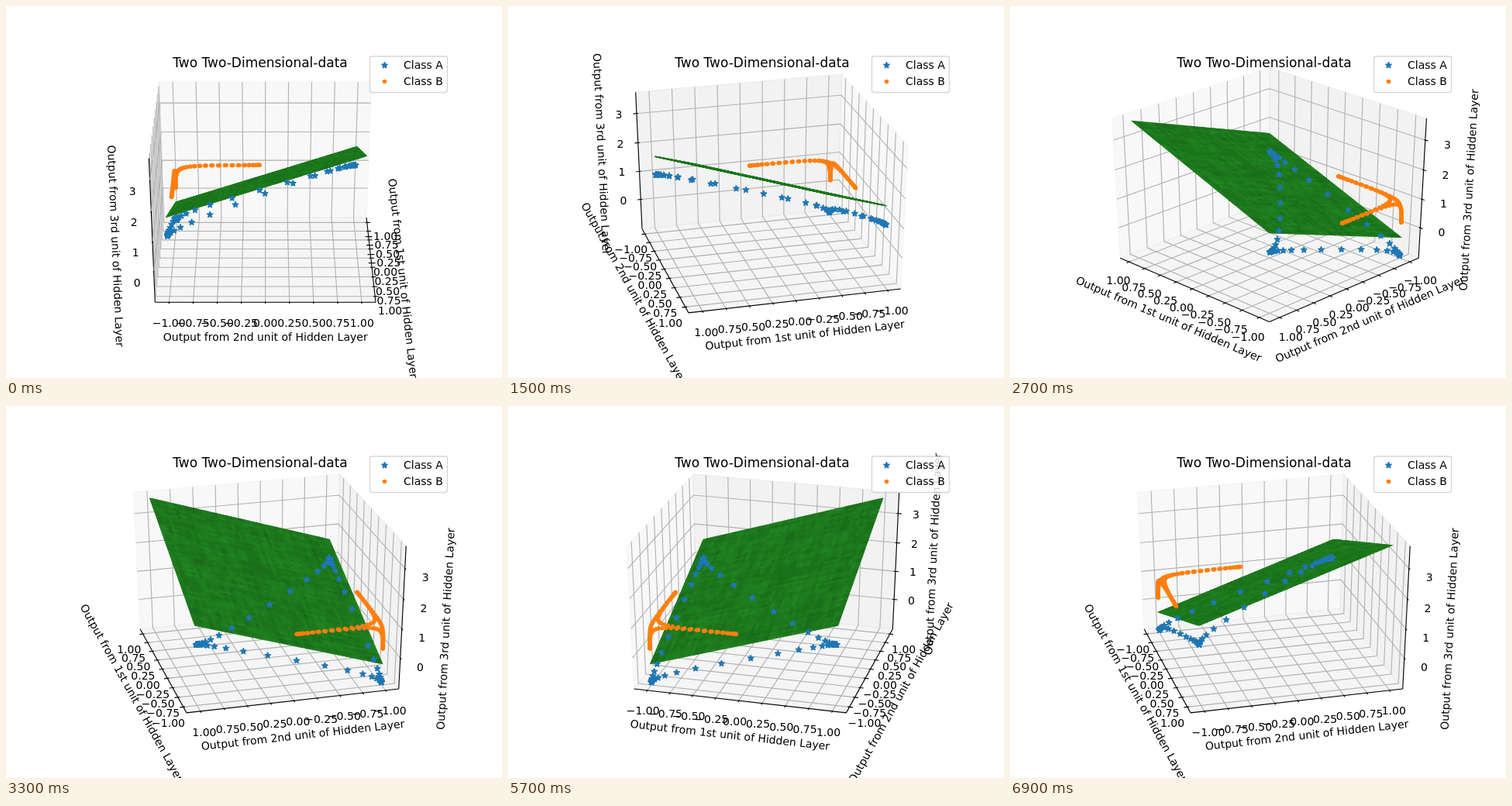
Animation, 640 px wide and 480 px high, one loop 7.2 s. Source, as an HTML page with a canvas:

```html
<!DOCTYPE html>
<html lang="en">
<head>
<meta charset="utf-8">
<title>Two Two-Dimensional-data</title>
<style>
  html, body { margin: 0; width: 100%; height: 100%; overflow: hidden; background: #fff; }
  canvas { display: block; }
</style>
</head>
<body>
<canvas id="stage" width="640" height="480"></canvas>
<script>
const ctx = document.getElementById('stage').getContext('2d');

const STEP_MS = 300, STEPS = 24;
const RAD = Math.PI / 180, ELEVATION = 30 * RAD, DISTANCE = 10;
const PT = 100 / 72;                      // pixels per typographic point
const HALF = 0.5 + 1 / 48;                // half side of the drawn box
const DELTA = 1 / 12, PAD = 48 / 623.232 * DELTA;
const LABEL_SHIFT = 25 * PAD, TICK_LABEL_SHIFT = 11.5 * PAD;
const LIMITS = [[-1.1, 1.1], [-1.1, 1.1], [-0.985, 3.62]];
const BLUE = '#1f77b4', ORANGE = '#ff7f0e';

const quarters = Array.from({ length: 9 }, (_, i) => i / 4 - 1);
const decimals = v => v.toFixed(2).replace('-', '\u2212');
const AXES = [
  { ticks: quarters, format: decimals, flip: 1, tickDir: 1, pane: 0.95, label: 'Output from 1st unit of Hidden Layer' },
  { ticks: quarters, format: decimals, flip: 0, tickDir: 0, pane: 0.90, label: 'Output from 2nd unit of Hidden Layer' },
  { ticks: [0, 1, 2, 3], format: String, flip: 0, tickDir: 0, pane: 0.925, label: 'Output from 3rd unit of Hidden Layer' }
];

// Data values to coordinates relative to the centre of the box.
const scale = (v, axis) => (v - LIMITS[axis][0]) / (LIMITS[axis][1] - LIMITS[axis][0]) - 0.5;
const place = point => point.map(scale);

// Each class is a circle of inputs passed through three tanh units.
const SAMPLES = 99;
function hiddenOutputs(radius) {
  const unit = (theta, angle, gain, bias) =>
    Math.tanh(gain * (radius * Math.cos((theta - angle) * RAD) - bias));
  return Array.from({ length: SAMPLES }, (_, i) => {
    const theta = i * 360 / SAMPLES;
    return place([
      unit(theta, 0.37, 5.8, 0.506),
      unit(theta, 121.47, 5.8, 0.506),
      -unit(theta, 241, 5.4, 0.531)
    ]);
  });
}
const classA = hiddenOutputs(1), classB = hiddenOutputs(0.495);

// Separating plane, cut into slightly uneven green cells.
const CELLS = 50;
const noise = (i, j) => {
  const n = Math.sin(i * 127.1 + j * 311.7) * 43758.5453;
  return n - Math.floor(n) - 0.5;
};
const planePoint = (i, j) => {
  const x = 2 * i / CELLS - 1, y = 2 * j / CELLS - 1;
  return place([x, y, 1.644 + 0.988 * (x + y)]);
};
const cells = [];
for (let i = 0; i < CELLS; i++) {
  for (let j = 0; j < CELLS; j++) {
    const shade = 0.87 + 0.04 * (noise(i, 90) + noise(80, j)) +
      0.09 * noise(i >> 2, j + 7) + 0.09 * noise(i + 9, j >> 2) + 0.04 * noise(i, j);
    cells.push({
      color: `rgb(${[34, 139, 34].map(c => Math.round(c * shade))})`,
      corners: [[i, j], [i + 1, j], [i + 1, j + 1], [i, j + 1]].map(c => planePoint(...c))
    });
  }
}

let camera, right, up;
function aim(azimuth) {
  const c = Math.cos(azimuth), s = Math.sin(azimuth);
  const ce = Math.cos(ELEVATION), se = Math.sin(ELEVATION);
  camera = [ce * c, ce * s, se];
  right = [-s, c, 0];
  up = [-se * c, -se * s, ce];
}
const dot = (a, b) => a[0] * b[0] + a[1] * b[1] + a[2] * b[2];
function project(p) {
  const depth = DISTANCE - dot(p, camera);
  return [
    80 + (dot(p, right) / depth + 0.095) / 0.185 * 496,
    427.2 - (dot(p, up) / depth + 0.095) / 0.185 * 369.6
  ];
}

function withCoord(p, axis, value) {
  const q = p.slice();
  q[axis] = value;
  return q;
}
const flipped = (p, axis) => withCoord(p, axis, -p[axis]);
const pushOut = (p, axis, amount) =>
  p.map((v, k) => k === axis ? v : v + (v < 0 ? -amount : amount));

function trace(points) {
  ctx.beginPath();
  points.forEach(p => ctx.lineTo(...project(p)));
}
function line(points, color) {
  trace(points);
  ctx.strokeStyle = color;
  ctx.lineWidth = 0.8 * PT;
  ctx.stroke();
}
function text(string, x, y, size = 14, align = 'center') {
  ctx.font = `${size}px "DejaVu Sans", sans-serif`;
  ctx.textAlign = align;
  ctx.fillStyle = '#000';
  ctx.fillText(string, x, y);
}

function drawPane(axis, corner) {
  const a = (axis + 1) % 3, b = (axis + 2) % 3;
  const grey = AXES[axis].pane * 255;
  trace([corner, flipped(corner, a), flipped(flipped(corner, a), b), flipped(corner, b)]);
  ctx.closePath();
  ctx.fillStyle = ctx.strokeStyle = `rgba(${grey},${grey},${grey},0.5)`;
  ctx.lineWidth = PT;
  ctx.fill();
  ctx.stroke();
}

function drawAxis(axis, corner) {
  const { ticks, format, flip, tickDir, label } = AXES[axis];
  const start = flipped(corner, flip), end = flipped(start, axis);
  line([start, end], '#000');

  const [x1, y1] = project(start), [x2, y2] = project(end);
  let angle = Math.atan2(y2 - y1, x2 - x1);
  if (angle >= Math.PI / 2) angle -= Math.PI;
  if (angle < -Math.PI / 2) angle += Math.PI;
  ctx.save();
  ctx.translate(...project(pushOut(withCoord(start, axis, 0), axis, LABEL_SHIFT)));
  ctx.rotate(angle);
  text(label, 0, 4);
  ctx.restore();

  for (const value of ticks) {
    const p = withCoord(corner, axis, scale(value, axis));
    line([flipped(p, (axis + 1) % 3), p, flipped(p, (axis + 2) % 3)], '#b0b0b0');
  }
  const sign = Math.sign(corner[tickDir]);
  for (const value of ticks) {
    const p = withCoord(start, axis, scale(value, axis));
    const along = f => withCoord(p, tickDir, p[tickDir] + f * sign * DELTA);
    line([along(0.1), along(-0.2)], '#000');
    const [x, y] = project(pushOut(p, axis, TICK_LABEL_SHIFT));
    text(format(value), x, y + 11);
  }
}

function drawSurface() {
  ctx.lineWidth = PT;
  for (const { color, corners } of cells) {
    trace(corners);
    ctx.closePath();
    ctx.fillStyle = ctx.strokeStyle = color;
    ctx.fill();
    ctx.stroke();
  }
}

function star(x, y) {
  ctx.beginPath();
  for (let k = 0; k < 10; k++) {
    const r = 3 * PT * (k % 2 ? 0.381966 : 1), a = k * Math.PI / 5;
    ctx.lineTo(x + r * Math.sin(a), y - r * Math.cos(a));
  }
  ctx.closePath();
  ctx.fillStyle = ctx.strokeStyle = BLUE;
  ctx.lineWidth = PT;
  ctx.lineJoin = 'bevel';
  ctx.fill();
  ctx.stroke();
  ctx.lineJoin = 'miter';
}
function disc(x, y) {
  ctx.beginPath();
  ctx.arc(x, y, 2 * PT, 0, 2 * Math.PI);
  ctx.fillStyle = ORANGE;
  ctx.fill();
}

function drawLegend() {
  ctx.beginPath();
  ctx.roundRect(469.5, 65, 100, 46.5, 2.8);
  ctx.fillStyle = 'rgba(255,255,255,0.8)';
  ctx.strokeStyle = 'rgba(204,204,204,0.8)';
  ctx.lineWidth = PT;
  ctx.fill();
  ctx.stroke();
  star(488.5, 76.5);
  disc(488.5, 97.5);
  text('Class A', 513, 81, 14, 'left');
  text('Class B', 513, 102, 14, 'left');
}

function draw(step) {
  aim(step * 2 * Math.PI / STEPS);
  ctx.fillStyle = '#fff';
  ctx.fillRect(0, 0, 640, 480);
  // The corner shared by the three back panes.
  const corner = camera.map(c => c < -1e-9 ? HALF : -HALF);
  AXES.forEach((_, axis) => drawPane(axis, corner));
  AXES.forEach((_, axis) => drawAxis(axis, corner));
  drawSurface();
  classA.forEach(p => star(...project(p)));
  classB.forEach(p => disc(...project(p)));
  text('Two Two-Dimensional-data', 328, 79, 17);
  drawLegend();
}

let shown = -1;
function tick() {
  const step = Math.floor(performance.now() / STEP_MS) % STEPS;
  if (step !== shown) draw(shown = step);
  requestAnimationFrame(tick);
}
tick();
</script>
</body>
</html>
```
